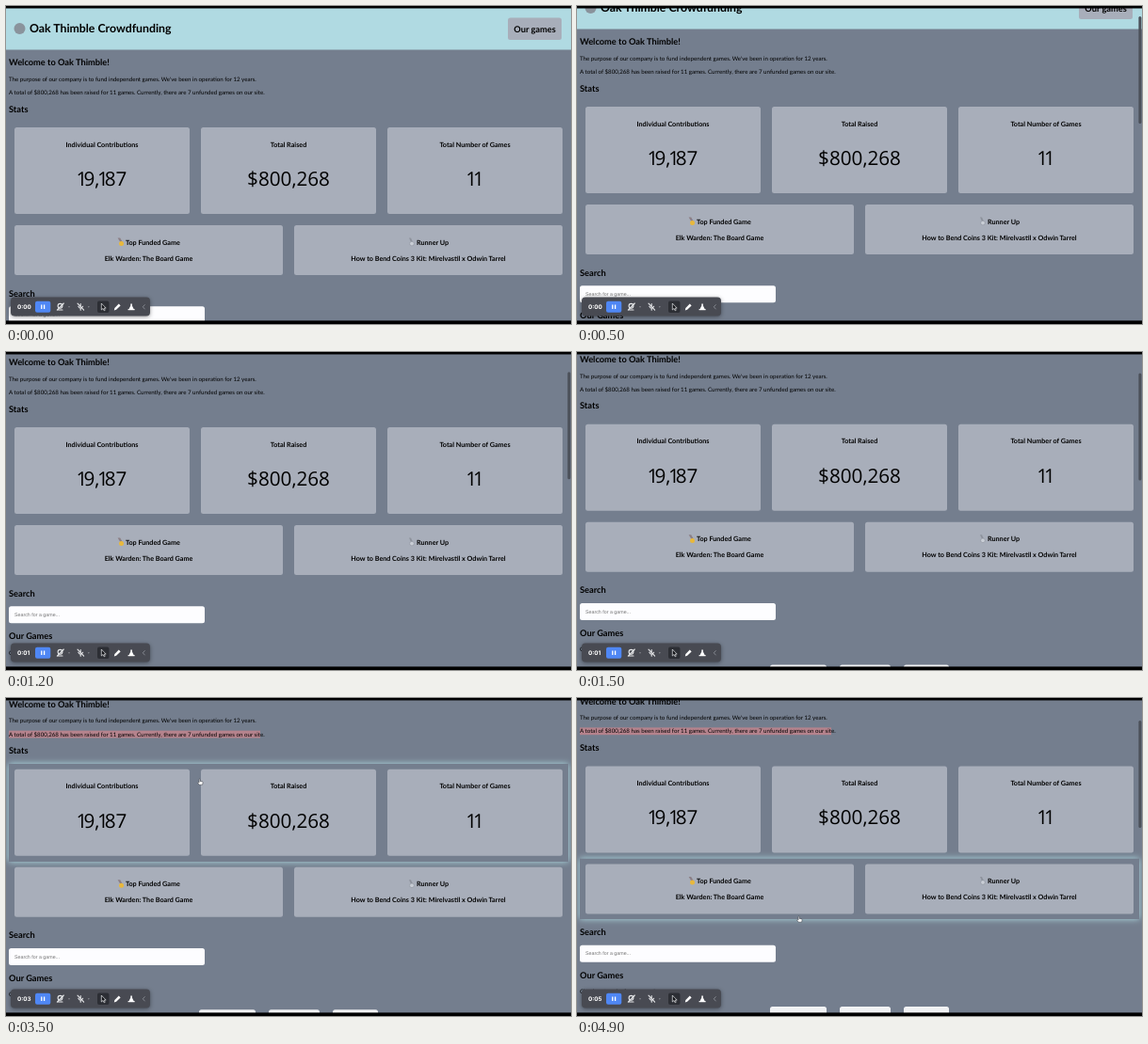
Animation, 600 px wide and 338 px high, one loop 5 s. Source, as an HTML page:

```html
<!DOCTYPE html>
<html lang="en">
<head>
<meta charset="utf-8">
<title>Crowdfunding page</title>
<style>
  html, body { margin: 0; width: 100%; height: 100%; overflow: hidden; background: #000; }
  svg { display: block; width: 600px; height: 338px; }
  text { font: 6.16px Lato, sans-serif; text-rendering: geometricPrecision; white-space: pre; }
  .h1 { font-size: 12.3px; font-weight: 700; }
  .h2 { font-size: 9.25px; font-weight: 700; }
  .h3 { font-size: 7.2px; font-weight: 700; }
  .mid { text-anchor: middle; }
  .num { font: 20.7px "Open Sans", sans-serif; text-anchor: middle; }
  .hint { font: 5.3px "Liberation Sans", Arial, sans-serif; fill: #757575; }
  .clock { font: 700 6.3px Inter, sans-serif; fill: #fff; }
  .card { fill: #a8aeba; }
  .glow { fill: #747e8e; filter: drop-shadow(0 0 3.85px #b0e0e6); }
  .mark { fill: #b5838d; }
  .icon { fill: none; stroke: #e9eaec; stroke-width: 1.1; stroke-linecap: round; stroke-linejoin: round; }
</style>
</head>
<body>
<svg viewBox="0 0 600 338">
  <rect width="600" height="338" fill="#747e8e"/>

  <g id="page">
    <rect width="600" height="46.5" fill="#b0dae2"/>
    <circle cx="14.5" cy="24" r="6" fill="#8a939c"/>
    <text class="h1" x="25" y="28.4">Oak Thimble Crowdfunding</text>
    <rect class="card" x="533" y="12.5" width="57" height="23.5" rx="2.5"/>
    <text class="h2 mid" x="561.5" y="27.6">Our games</text>

    <text class="h2" x="3" y="63.2">Welcome to Oak Thimble!</text>
    <text x="3" y="79.8">The purpose of our company is to fund independent games. We've been in operation for 12 years.</text>
    <rect id="word" class="mark" x="164" y="88" width="13" height="7.8"/>
    <rect id="line" class="mark" x="3" y="88" width="267" height="7.8"/>
    <text x="3" y="94.1">A total of $800,268 has been raised for 11 games. Currently, there are 7 unfunded games on our site.</text>
    <text class="h2" x="3" y="112.7">Stats</text>

    <rect id="glow1" class="glow" x="3" y="123.3" width="594" height="104"/>
    <rect id="glow2" class="glow" x="3" y="227.3" width="594" height="64.3"/>

    <rect class="card" x="9" y="129" width="186" height="92" rx="2.5"/>
    <rect class="card" x="207" y="129" width="186" height="92" rx="2.5"/>
    <rect class="card" x="405" y="129" width="186" height="92" rx="2.5"/>
    <text class="h3 mid" x="102" y="149.5">Individual Contributions</text>
    <text class="h3 mid" x="300" y="149.5">Total Raised</text>
    <text class="h3 mid" x="498" y="149.5">Total Number of Games</text>
    <text class="num" x="101.5" y="191" dx="0 -4 0 -2.5 -4">19,187</text>
    <text class="num" x="300" y="191">$800,268</text>
    <text class="num" x="498" y="191" dx="0 -4">11</text>

    <rect class="card" x="9" y="233" width="285" height="53" rx="2.5"/>
    <rect class="card" x="306" y="233" width="285" height="53" rx="2.5"/>
    <path d="M118.6 246.5h2.6l2.6 4.5h-2.4z" fill="#8b7f86"/>
    <circle cx="122.5" cy="252.6" r="2.5" fill="#e8b83c"/>
    <path d="M428 246.5h2l2 4.5h-2z" fill="#8d929c"/>
    <circle cx="431" cy="252.6" r="2.3" fill="#c9ced6" stroke="#858b95" stroke-width=".5"/>
    <text class="h3" x="127" y="253.6">Top Funded Game</text>
    <text class="h3" x="436" y="253.6">Runner Up</text>
    <text class="h3 mid" x="151.5" y="270.6">Elk Warden: The Board Game</text>
    <text class="h3 mid" x="448.5" y="270.6">How to Bend Coins 3 Kit: Mirelvastil x Odwin Tarrel</text>

    <text class="h2" x="3" y="308.7">Search</text>
    <rect x="3" y="319.3" width="208" height="18" rx="2.5" fill="#fdfdff"/>
    <text class="hint" x="9" y="330">Search for a game...</text>
    <text class="h2" x="3" y="354.2">Our Games</text>
    <text x="3" y="370.6">Check out each of our games!</text>
    <g fill="#f1f2f4">
      <rect x="205" y="384.6" width="60" height="18" rx="2.5"/>
      <rect x="279" y="384.6" width="54" height="18" rx="2.5"/>
      <rect x="347" y="384.6" width="48" height="18" rx="2.5"/>
    </g>
  </g>

  <rect id="thumb" x="596.4" width="3" height="114" rx="1.5" fill="#4b5059"/>

  <g id="bar">
    <rect x="5" y="309.5" width="148" height="20" rx="4" fill="#484a52" style="filter: drop-shadow(0 1px 2px #0006)"/>
    <text id="clock" class="clock" x="12" y="321.8"></text>
    <rect x="31" y="313.8" width="16.3" height="12" rx="2" fill="#4f87f5"/>
    <path d="M37.8 317.5v4.6M40.6 317.5v4.6" stroke="#fff" stroke-width="1.3"/>
    <g class="icon">
      <circle cx="57.5" cy="318.8" r="2.4"/>
      <path d="M55 323h5M54.3 323.2l7-7.2"/>
      <path d="M79.2 316.6v2.6M76.8 319.3q2.4 4 4.8 0M79.2 321.5v1.8M76 316.2l6.6 7"/>
      <path d="M147.3 317.6l-2 2.2 2 2.2" stroke="#8b8e96" stroke-width=".9"/>
    </g>
    <path d="M66 319.4h2l-1 1.2zM86.8 319.4h2l-1 1.2z" fill="#b4b6bc"/>
    <rect x="97" y="313.6" width="12.5" height="12.4" rx="2" fill="#2c2e34"/>
    <path d="M101.3 316v7l1.7-1.5 1.2 2.3 1-.5-1.1-2.2h2.1z" fill="#15161a" stroke="#e9eaec" stroke-width=".7"/>
    <path d="M114.8 323.4l.6-2.3 4.4-4.5 1.8 1.8-4.5 4.4z" fill="#fff"/>
    <path d="M129.6 323.3h7v-1.2h-1l-1.7-3.6v-2h-1.6v2l-1.7 3.6h-1z" fill="#fff"/>
  </g>

  <g id="beam"><path d="M-1.2-3.2h2.4M0-3.2v6.4M-1.2 3.2h2.4" stroke="#d8dbe0" stroke-width=".8" fill="none"/></g>
  <g id="arrow"><path d="M0 0v6.4l1.5-1.3 1.1 2.2 1-.5-1-2.1h2z" fill="#111" stroke="#fff" stroke-width=".5"/></g>
  <g id="hand"><path d="M-.9-2.6q.6-.8 1.1 0v2l2.3.5q.7.2.6 1l-.5 2.3h-3.4l-1.8-2.4q.2-.9 1.7.1z" fill="#fff" stroke="#30343b" stroke-width=".5"/></g>

  <rect width="600" height="2.5"/>
  <rect y="334.4" width="600" height="3.6"/>
</svg>
<script>
const LOOP = 5000, STEP = 100;
const el = id => document.getElementById(id);

// Keys are [time, ...values]; values between keys are linear.
const scrollKeys = [[200, 0], [300, 5], [500, 22], [700, 37], [900, 45], [1200, 49], [1600, 53.3], [4400, 53.3], [4900, 56.6]];
const mouseKeys = [[2400, 177, 38], [2800, 190, 52], [3100, 200, 73], [3500, 206, 89], [3900, 222, 180], [4200, 228, 215], [4900, 236, 235]];

function at(keys, t) {
  const i = keys.findIndex(k => k[0] > t);
  if (i === 0) return keys[0].slice(1);
  if (i < 0) return keys[keys.length - 1].slice(1);
  const a = keys[i - 1], b = keys[i], p = (t - a[0]) / (b[0] - a[0]);
  return a.slice(1).map((v, n) => v + (b[n + 1] - v) * p);
}
const ramp = (t, start) => Math.min(1, Math.max(0, (t - start) / 200));
const show = (id, on) => el(id).setAttribute("opacity", +on);
const move = (id, x, y) => el(id).setAttribute("transform", `translate(${x} ${y})`);

function draw(t) {
  const [scroll] = at(scrollKeys, t), [x, y] = at(mouseKeys, t);
  move("page", 0, -scroll);
  move("thumb", 0, 2.8 + scroll * .375);
  show("thumb", t >= 300 && t < 2100 || t >= 4500);
  show("word", t >= 2100 && t < 2300);
  show("line", t >= 2300);
  show("glow1", ramp(t, 3000) - ramp(t, 3700));
  show("glow2", ramp(t, 3800));
  for (const id of ["beam", "arrow", "hand"]) move(id, x, y);
  show("beam", t >= 2000 && t < 2700);
  show("arrow", t >= 2700 && t < 3100);
  show("hand", t >= 3100);
  el("clock").textContent = "0:0" + Math.floor((t + 200) / 1000);
}

const begin = performance.now();
function tick() {
  const t = (performance.now() - begin) % LOOP;
  draw(Math.floor(t / STEP) * STEP);
  requestAnimationFrame(tick);
}
tick();
</script>
</body>
</html>
```
